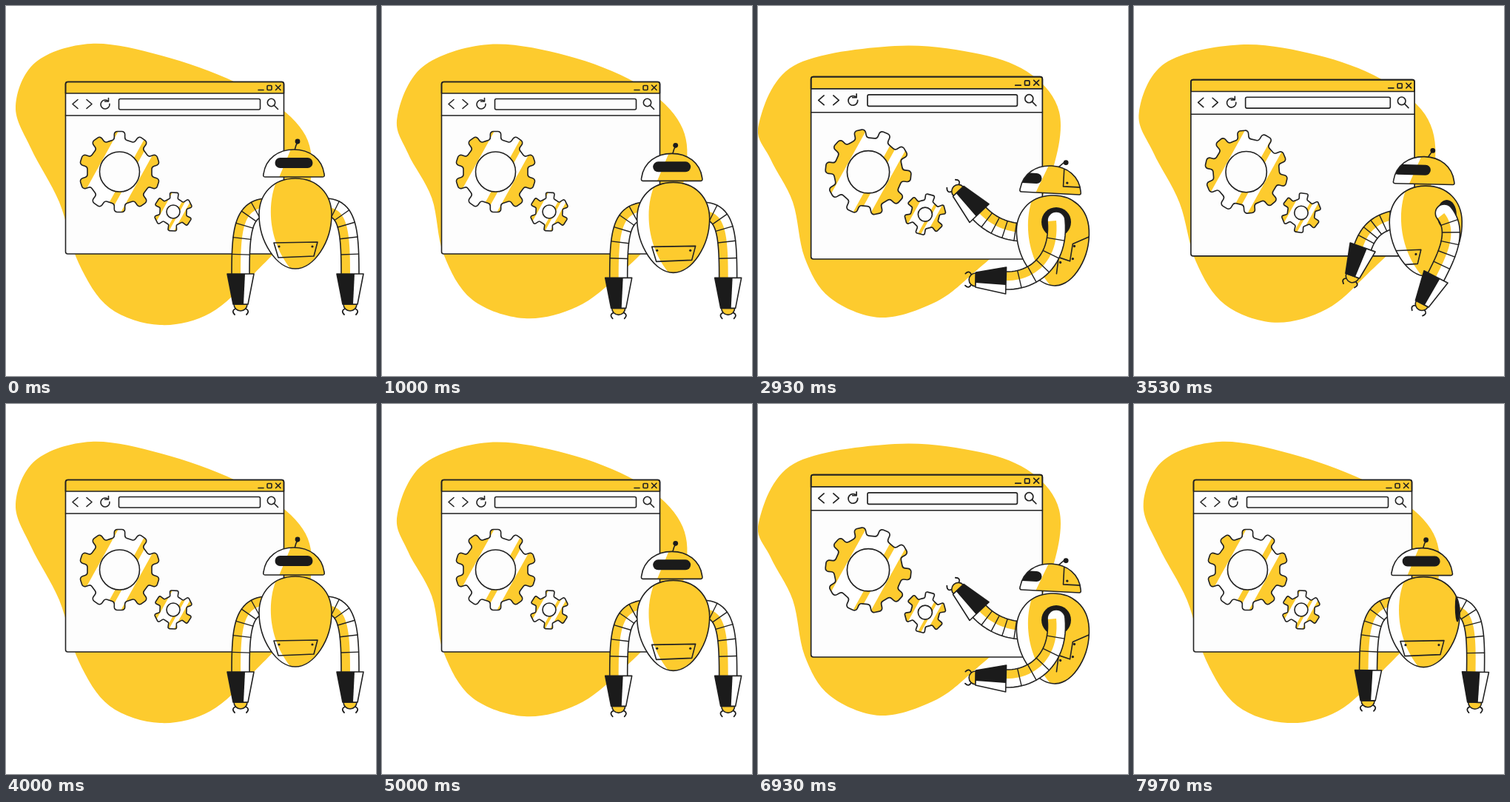
Animation, 500 px wide and 500 px high, one loop 8.01 s. Source, as an HTML page with a canvas:

```html
<!DOCTYPE html>
<html lang="en">
<head>
<meta charset="utf-8">
<title>Robot at work</title>
<style>
  html, body { margin: 0; width: 100%; height: 100%; overflow: hidden; background: #fff; }
  canvas { display: block; width: 500px; height: 500px; }
</style>
</head>
<body>
<canvas id="stage"></canvas>
<script>
const canvas = document.getElementById('stage');
const ctx = canvas.getContext('2d');
const ratio = window.devicePixelRatio || 1;
canvas.width = canvas.height = 500 * ratio;

const YELLOW = '#fdcb2e', INK = '#222', BLACK = '#1b1b1b', WHITE = '#fff', PAPER = '#fdfdfd';
const LOOP = 8010, CYCLE = 4000, REACH = 1930, PRESS = 2930;

const clamp = v => Math.max(0, Math.min(1, v));
const part = (t, a, b) => clamp((t - a) / (b - a));
const smooth = (t, a, b) => { const u = part(t, a, b); return u * u * (3 - 2 * u); };
const mix = (a, b, u) => a.map((v, i) => v + (b[i] - v) * u);

// Blob outlines, clockwise from the left edge
const blobRest = [13,135, 40,76, 115,51, 210,67, 310,103, 385,150, 413,205, 396,290, 335,362,
  276,415, 208,431, 140,408, 98,347, 72,265, 34,193];
const blobReach = [14,165, 55,88, 170,53, 285,67, 372,104, 412,155, 411,215, 380,290, 312,360,
  252,399, 178,414, 105,386, 70,325, 50,255, 23,205];
const blobPress = [1,160, 48,81, 185,54, 300,65, 370,93, 407,143, 400,215, 365,290, 290,362,
  238,401, 165,421, 97,394, 63,340, 47,265, 17,207];
const blobMid = mix(blobRest, blobReach, .5);
[0, 2, 26, 28].forEach(i => blobMid[i] += 7);
const blobKeys = [blobRest, blobMid, blobReach, blobPress];
const blobTimes = [0, 950, REACH, PRESS, CYCLE];

// head xy, body xy, near arm curve, far arm curve, then tilt, ball, visor, lean, yaw
const rest = [389,231, 391,294, 432,272, 462,272, 465,305, 465,362,
  350,272, 320,275, 317,305, 317,362, 0, 5, 0, 0, 0];
const reach = [401,268, 408,331, 424,305, 432,355, 405,376, 378,386,
  390,335, 365,350, 345,357, 324,363, -1, 10, -19, -5, 1];
const press = [395,253, 399,317, 403,290, 408,345, 372,372, 335,371,
  380,305, 345,310, 318,300, 299,280, 3, 19, -38, -3, 1];
const COORDS = 20;

function poseAt(t) {
  if (t < REACH) {
    const drop = smooth(t, 700, 1900);
    const low = rest.map((v, i) => i < COORDS ? v + (i % 2 ? 34 : 17) * drop : v);
    return mix(low, reach, part(t, 1560, REACH) ** 2);
  }
  if (t < PRESS) return mix(reach, press, smooth(t, REACH, PRESS));
  return mix(press, rest, part(t, PRESS, CYCLE));
}

function paint(fill, stroke = INK, width = 1.6) {
  if (fill) { ctx.fillStyle = fill; ctx.fill(); }
  if (stroke) { ctx.strokeStyle = stroke; ctx.lineWidth = width; ctx.stroke(); }
}

function line(points, closed) {
  ctx.beginPath();
  points.forEach(([x, y]) => ctx.lineTo(x, y));
  if (closed) ctx.closePath();
}

function disc(x, y, r, fill, stroke) {
  ctx.beginPath();
  ctx.arc(x, y, r, 0, Math.PI * 2);
  paint(fill, stroke);
}

function box(x, y, w, h, r, fill, stroke) {
  ctx.beginPath();
  ctx.roundRect(x, y, w, h, r);
  paint(fill, stroke);
}

function group(x, y, degrees, draw) {
  ctx.save();
  ctx.translate(x, y);
  ctx.rotate(degrees * Math.PI / 180);
  draw();
  ctx.restore();
}

function drawBlob(t) {
  let k = 0;
  while (k < 3 && t >= blobTimes[k + 1]) k++;
  const u = part(t, blobTimes[k], blobTimes[k + 1]);
  const [a, b, c, d] = [3, 0, 1, 2].map(n => blobKeys[(k + n) % 4]);
  const flat = b.map((v, i) => v + u * .5 * (c[i] - a[i] +
    u * (2 * a[i] - 5 * v + 4 * c[i] - d[i] + u * (3 * (v - c[i]) + d[i] - a[i]))));
  const n = flat.length / 2;
  const at = i => { const j = (i + n) % n * 2; return [flat[j], flat[j + 1]]; };
  ctx.beginPath();
  ctx.moveTo(...at(0));
  for (let i = 0; i < n; i++) {
    const [p, q, r, s] = [at(i - 1), at(i), at(i + 1), at(i + 2)];
    ctx.bezierCurveTo(q[0] + (r[0] - p[0]) / 6, q[1] + (r[1] - p[1]) / 6,
      r[0] - (s[0] - q[0]) / 6, r[1] - (s[1] - q[1]) / 6, ...r);
  }
  paint(YELLOW, null);
}

function drawGear(x, y, teeth, outer, root, hole, half, turn) {
  const points = [];
  for (let i = 0; i < teeth; i++) {
    for (const [r, a] of [[root, -half * 1.25], [outer, -half], [outer, half], [root, half * 1.25]]) {
      const angle = (i * 360 / teeth + a + turn) * Math.PI / 180;
      points.push([r * Math.sin(angle), -r * Math.cos(angle)]);
    }
  }
  group(x, y, 0, () => {
    const last = points[points.length - 1];
    const outline = new Path2D();
    outline.moveTo((last[0] + points[0][0]) / 2, (last[1] + points[0][1]) / 2);
    points.forEach((p, i) => outline.arcTo(...p, ...points[(i + 1) % points.length], outer * .075));
    outline.closePath();
    ctx.save();
    ctx.clip(outline);
    ctx.fillStyle = WHITE;
    ctx.fillRect(-60, -60, 120, 120);
    const s = outer / 55;
    for (const [from, to] of [[-130, -32], [9, 18], [32, 130]]) {
      const skew = 36;
      line([[from * s + skew, -65], [to * s + skew, -65], [to * s - skew, 65], [from * s - skew, 65]], true);
      paint(YELLOW, null);
    }
    ctx.restore();
    ctx.strokeStyle = INK;
    ctx.lineWidth = 1.6;
    ctx.stroke(outline);
    disc(0, 0, hole, PAPER, INK);
  });
}

function drawWindow(p) {
  ctx.save();
  ctx.translate(228, 218.5);
  ctx.scale(1 + .06 * p, 1 + .06 * p);
  ctx.translate(-228, -218.5);
  box(80.5, 102.5, 295, 232.5, 3, PAPER, null);
  box(80.5, 102.5, 295, 15.5, [3, 3, 0, 0], YELLOW, INK);
  box(80.5, 102.5, 295, 232.5, 3, null, INK);
  line([[80.5, 148], [375.5, 148]]); paint();
  line([[341, 113.5], [348, 113.5]]); paint();
  box(353, 107.5, 6, 6, 1, null, INK);
  line([[364.5, 107], [371, 113.5]]); paint();
  line([[371, 107], [364.5, 113.5]]); paint();
  line([[97, 126.5], [90, 132.5], [97, 138.5]]); paint();
  line([[109, 126.5], [116, 132.5], [109, 138.5]]); paint();
  ctx.beginPath();
  ctx.arc(134, 133, 6, -.1, Math.PI * 1.7); paint();
  line([[138.5, 124.5], [138.5, 129], [133.5, 129]]); paint();
  box(152.5, 125.5, 191, 14.5, 2, PAPER, INK);
  disc(358.5, 130.5, 5.2, null, INK);
  line([[362.5, 134.5], [367.5, 139.5]]); paint();
  drawGear(153.5, 224, 10, 55, 44, 27, 7.5, -12 * p);
  drawGear(226, 278, 6, 26.5, 18.5, 9, 13, 3 + 12 * p);
  ctx.restore();
}

function drawHand(x, y, angle) {
  ctx.save();
  ctx.translate(x, y);
  ctx.rotate(angle);
  for (const side of [-1, 1]) {
    ctx.beginPath();
    ctx.moveTo(47, 7 * side);
    ctx.quadraticCurveTo(50, 13 * side, 55, 8 * side);
    paint(null, BLACK, 1.8);
  }
  ctx.beginPath();
  ctx.arc(41, 0, 9, -Math.PI / 2, Math.PI / 2);
  ctx.closePath();
  paint(YELLOW);
  line([[0, -18], [0, 18], [41, 10], [41, -10]], true);
  paint(WHITE);
  line([[0, -6], [0, 18], [41, 10], [41, -4]], true);
  paint(BLACK, null);
  ctx.restore();
}

function drawArm(c, capped) {
  const N = 24, R = 12;
  const steps = Array.from({ length: N + 1 }, (_, i) => {
    const u = i / N, v = 1 - u;
    const at = k => v ** 3 * c[k] + 3 * v * v * u * c[k + 2] + 3 * v * u * u * c[k + 4] + u ** 3 * c[k + 6];
    const slope = k => v * v * (c[k + 2] - c[k]) + 2 * v * u * (c[k + 4] - c[k + 2]) + u * u * (c[k + 6] - c[k + 4]);
    return { x: at(0), y: at(1), angle: Math.atan2(slope(1), slope(0)) };
  });
  const off = (s, d) => [s.x - Math.sin(s.angle) * d, s.y + Math.cos(s.angle) * d];
  const strip = (a, b) => line([...steps.map(s => off(s, a)), ...steps.map(s => off(s, b)).reverse()], true);
  if (capped) disc(c[0], c[1], R, WHITE, INK);
  strip(-R, R); paint(WHITE, null);
  strip(0, R); paint(YELLOW, null);
  for (const d of [-R, R]) { line(steps.map(s => off(s, d))); paint(); }
  for (let i = 4; i < N; i += 4) { line([off(steps[i], -R), off(steps[i], R)]); paint(null, INK, 1.4); }
  drawHand(c[6], c[7], steps[N].angle);
}

const egg = new Path2D('M0-61C30-61 49-40 49-12C49 25 25 61 0 61C-25 61-49 25-49-12C-49-40-30-61 0-61Z');
const eggWhite = new Path2D('M-22-65C-40-30-38 25-3 65L-60 65V-65Z');
const dome = new Path2D('M-39 0Q-42 0-41-4C-38-25-21-37 0-37C21-37 38-25 41-4Q42 0 39 0Z');
const domeWhite = new Path2D('M-3-40L-21 3H-50V-40Z');

// Fills a path with its light side and clips whatever is drawn on it
function shell(path, light, details) {
  ctx.save();
  ctx.clip(path);
  ctx.fillStyle = YELLOW;
  ctx.fill(path);
  ctx.fillStyle = WHITE;
  ctx.fill(light);
  details();
  ctx.restore();
  ctx.strokeStyle = INK;
  ctx.lineWidth = 1.6;
  ctx.stroke(path);
}

function drawBody(x, y, lean, yaw, shoulder) {
  group(x, y, lean, () => shell(egg, eggWhite, () => {
    group(-85 * yaw, 0, 0, () => {
      line([[-29, 26], [30, 25], [25, 44], [-23, 46]], true); paint();
      disc(-22, 31, 1.6, INK, null);
      disc(23, 31, 1.6, INK, null);
    });
    group(65 * (1 - yaw), 0, 0, () => {
      line([[50, -3], [26, 6], [21, 29], [6, 23]]); paint();
      line([[6, 23], [2, 45]]); paint();
      for (const [a, b] of [[28, 9], [25, 26], [8, 30]]) disc(a, b, 1.7, INK, null);
    });
    ctx.rotate(-lean * Math.PI / 180);
    ctx.beginPath();
    ctx.ellipse(shoulder[0] + 6 * (1 - yaw) - x, shoulder[1] + 2 - y, 20 * Math.sqrt(yaw), 20, 0, 0, Math.PI * 2);
    if (yaw > 0) paint(BLACK, null);
  }));
}

function drawHead(x, y, tilt, ball, visor, yaw) {
  group(x, y, tilt, () => {
    line([[ball * .6 - 2, -36], [ball - 2, -43], [ball, -48 + ball * .25]]); paint();
    disc(ball, -50 + ball * .4, 3.4, BLACK, null);
    shell(dome, domeWhite, () => {
      box(visor - 25.5, -26, 51, 14, 7, BLACK, null);
      group(50 * (1 - yaw), 0, 0, () => {
        line([[17, -34], [17, -10], [42, -10]]); paint();
        disc(22, -15, 1.7, INK, null);
      });
    });
  });
}

function drawRobot(pose) {
  const [hx, hy, bx, by] = pose;
  const near = pose.slice(4, 12), far = pose.slice(12, COORDS);
  const [tilt, ball, visor, lean, yaw] = pose.slice(COORDS);
  const inFront = yaw > .3;
  drawArm(far);
  if (!inFront) drawArm(near);
  drawBody(bx, by, lean, yaw, near);
  drawHead(hx, hy, tilt, ball, visor, yaw);
  if (inFront) drawArm(near, true);
}

function render(now) {
  const t = now % LOOP % CYCLE;
  ctx.setTransform(ratio, 0, 0, ratio, 0, 0);
  ctx.fillStyle = WHITE;
  ctx.fillRect(0, 0, 500, 500);
  ctx.lineCap = ctx.lineJoin = 'round';
  drawBlob(t);
  drawWindow(t < PRESS ? smooth(t, REACH, PRESS) : 1 - smooth(t, PRESS, CYCLE));
  drawRobot(poseAt(t));
}

const start = performance.now();
function tick() {
  render(performance.now() - start);
  requestAnimationFrame(tick);
}
tick();
</script>
</body>
</html>
```
